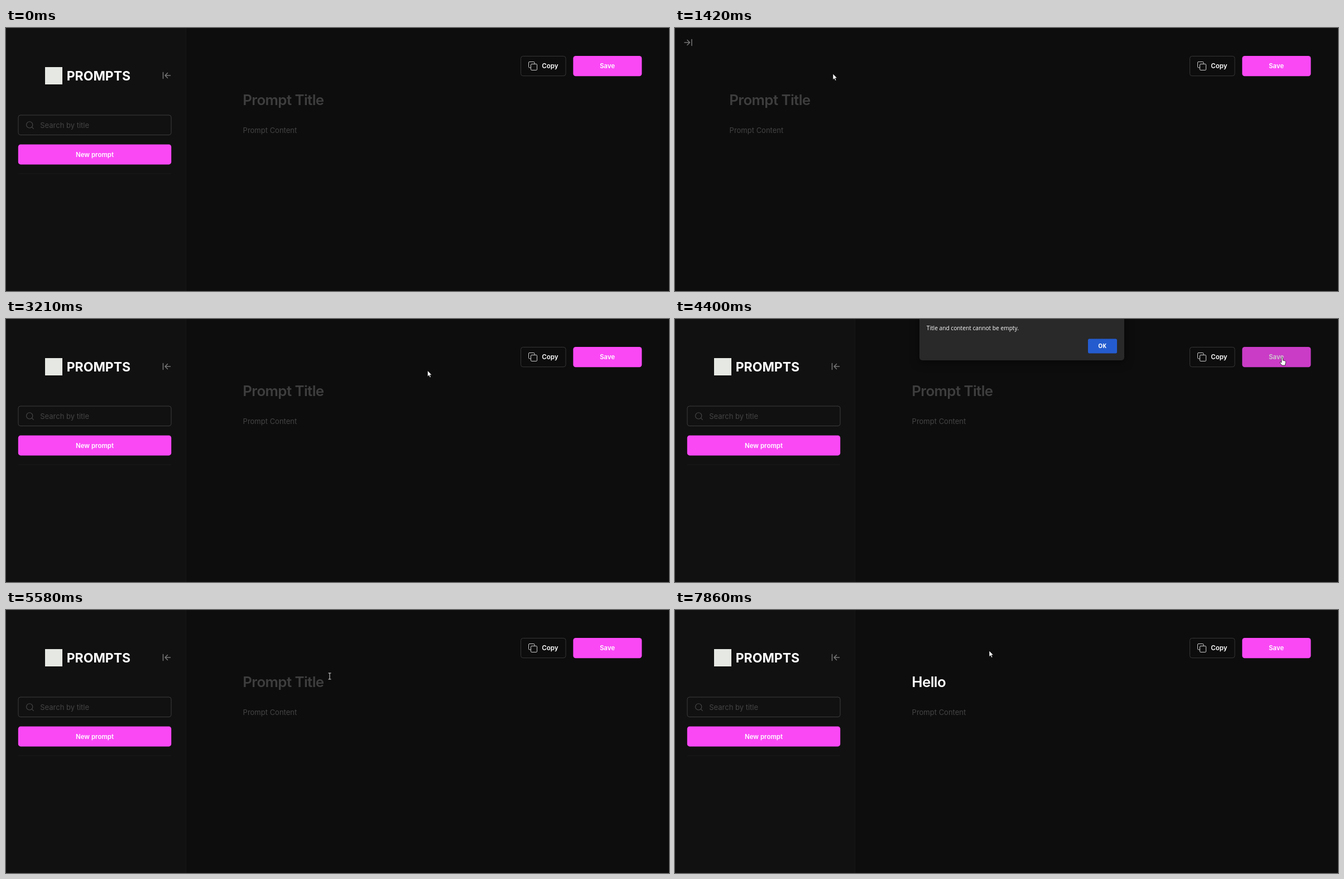
An HTML page that plays this animation: 1188 by 471 pixels, repeating every 7990 ms.

```html
<!DOCTYPE html>
<html lang="en">
<head>
<meta charset="utf-8">
<title>Prompt editor</title>
<style>
  html, body { margin: 0; width: 100%; height: 100%; overflow: hidden; background: #0d0d0d; }
  svg { display: block; width: 1188px; height: 471px; font-family: Inter, sans-serif; }
  .line { fill: none; stroke-linecap: round; stroke-linejoin: round; }
  .button { font-size: 11.5px; font-weight: 600; fill: #fff; text-anchor: middle; }
  .hint { font-size: 13px; fill: #444; }
  .pink { fill: #fa48f5; }
  #title { font-size: 25.92px; font-weight: 600; letter-spacing: -.023em; }
  #dialog { font-family: "Open Sans", "Noto Sans", sans-serif; filter: drop-shadow(0 3px 8px #0008); }
</style>
</head>
<body>
<svg viewBox="0 0 1188 471">
  <defs>
    <path id="toggle" class="line" stroke="#777" stroke-width="1.5" d="M1.5 -5.5V5.5M14.5 0H5M9.5 -4.5L5 0L9.5 4.5"/>
  </defs>

  <g id="sidebar">
    <rect width="323" height="471" fill="#111"/>
    <path d="M322.5 0V471" stroke="#161616"/>
    <rect x="70" y="70" width="31" height="31" fill="#e6e8e3"/>
    <text x="108.7" y="93.5" font-size="23" font-weight="700" fill="#fff">PROMPTS</text>
    <use href="#toggle" x="280" y="85"/>
    <rect x="22" y="156" width="274" height="35.5" rx="4" fill="none" stroke="#3c3c3c"/>
    <g class="line" stroke="#4a4a4a" stroke-width="1.1">
      <circle cx="42.2" cy="173.4" r="5.6"/>
      <path d="M46.3 177.4L49.3 180.4"/>
    </g>
    <text class="hint" x="61.2" y="178.9">Search by title</text>
    <rect class="pink" x="21.8" y="208.4" width="274.4" height="36" rx="4.5"/>
    <text class="button" x="159" y="230.8">New prompt</text>
    <path d="M22 261H296" stroke="#1a1a1a"/>
  </g>
  <use id="opener" href="#toggle" transform="translate(31.5 26) scale(-1 1)"/>

  <g id="editor">
    <text id="title" x="424.2" y="137.8"></text>
    <text class="hint" x="424.6" y="188.2">Prompt Content</text>
    <rect id="caret" y="112" width="1" height="32" fill="#fff"/>
  </g>

  <rect x="922.5" y="50.5" width="80.5" height="35.2" rx="4" fill="none" stroke="#363636"/>
  <g class="line" stroke="#ccc">
    <rect x="940.5" y="64.5" width="11" height="11" rx="1.4"/>
    <path d="M940.5 71H938Q936.5 71 936.5 69.5V62Q936.5 60.5 938 60.5H945.5Q947 60.5 947 62V64.5"/>
  </g>
  <text class="button" x="974.8" y="72.3">Copy</text>
  <g id="save">
    <rect class="pink" x="1016.3" y="50" width="123" height="36.2" rx="4.5"/>
    <text class="button" x="1077.5" y="72.3">Save</text>
  </g>

  <g id="dialog">
    <rect x="438" y="-20" width="367" height="94" rx="5" fill="#292929"/>
    <text x="450.8" y="19.7" font-size="10.2" fill="#fff">Title and content cannot be empty.</text>
    <rect x="740" y="35.5" width="52" height="26" rx="2.5" fill="#245ccf"/>
    <text x="765.5" y="52" font-size="10" font-weight="700" fill="#fff" text-anchor="middle">OK</text>
  </g>

  <path id="cursor" stroke-linejoin="round"/>
</svg>
<script>
const LOOP = 7990;
const TICK = LOOP / 118;   // the pointer moves in discrete steps
const $ = id => document.getElementById(id);
const show = (id, on) => $(id).setAttribute('visibility', on ? 'visible' : 'hidden');
const clamp = v => Math.min(1, Math.max(0, v));
const ramp = (t, from, to) => clamp((t - from) / (to - from));

const shapes = {
  arrow: { d: 'M0 0V10.6L2.5 8.4L4.2 12.2L5.9 11.4L4.2 7.7H7.5Z', fill: '#fff', stroke: '#000', 'stroke-width': .6 },
  hand: {
    d: 'M-1.2 1.2C-1.2 -.3 1.2 -.3 1.2 1.2V5L5.2 6Q6.8 6.5 6.4 8.2L5.3 14H-.5L-3.9 9.4Q-4.2 7.6 -2.8 7.8L-1.2 9.2Z',
    fill: '#fff', stroke: '#000', 'stroke-width': .7
  },
  beam: { d: 'M-2.5 -5.5H2.5M0 -5.5V5.5M-2.5 5.5H2.5', fill: 'none', stroke: '#ddd', 'stroke-width': 1 }
};

// Pointer moves: start, end, from x, y, to x, y, easing power
const moves = [
  [80, 880, 1016, 450, 291, 108, 2.5],
  [880, 1150, 291, 108, 283, 82, 2],
  [1690, 2310, 283, 82, 30, 35, 2.5],
  [2340, 2520, 30, 35, 24, 30, 2],
  [2930, 3215, 24, 30, 762, 93, 1],
  [3215, 3740, 762, 93, 1088, 69, 3],
  [4435, 5170, 1088, 69, 768, 47, 2.5],
  [5240, 5585, 768, 47, 580, 118.5, 2],
  [5585, 5850, 580, 118.5, 560, 129, 2],
  [7720, 7860, 577, 107, 563, 73, 1]
];

// Pointer shape from each time on
const kinds = [
  [0, ''], [140, 'arrow'], [1010, 'hand'], [1280, 'arrow'], [2240, 'hand'], [2720, 'arrow'],
  [3420, 'hand'], [4450, 'arrow'], [5500, 'beam'], [6510, ''], [7790, 'arrow']
];
const keys = [[6510, 'H'], [6780, 'e'], [6910, 'l'], [7040, 'l'], [7240, 'o']];

function drawCursor(t) {
  const kind = kinds.findLast(k => k[0] <= t)[1];
  show('cursor', kind);
  if (!kind) return;
  const stepped = Math.floor((t + 10) / TICK) * TICK + 30;
  const [start, end, x0, y0, x1, y1, power] = moves.findLast(m => m[0] <= stepped);
  const e = 1 - (1 - ramp(stepped, start, end)) ** power;
  const cursor = $('cursor');
  for (const name in shapes[kind]) cursor.setAttribute(name, shapes[kind][name]);
  cursor.setAttribute('transform', `translate(${x0 + (x1 - x0) * e} ${y0 + (y1 - y0) * e})`);
}

function draw(t) {
  const closed = t >= 1210 && t < 2690;
  show('sidebar', !closed);
  show('opener', closed);
  $('editor').setAttribute('transform', `translate(${closed ? -327 : 0} 0)`);

  const typed = keys.filter(k => k[0] <= t).map(k => k[1]).join('');
  const title = $('title');
  title.textContent = typed || 'Prompt Title';
  title.setAttribute('fill', typed ? '#fff' : '#3e3e3e');

  show('caret', t >= 5810 && t < 6310 || t >= 6510 && t < 7790);
  const width = typed ? title.getComputedTextLength() : 0;
  $('caret').setAttribute('x', Math.floor(424 + width));

  $('save').setAttribute('opacity', 1 - .2 * (ramp(t, 3650, 3850) - ramp(t, 5240, 5440)));
  $('dialog').setAttribute('opacity', ramp(t, 3930, 4140) - ramp(t, 5230, 5330));
  drawCursor(t);
}

const begin = performance.now();
(function frame() {
  draw((performance.now() - begin) % LOOP);
  requestAnimationFrame(frame);
})();
</script>
</body>
</html>
```
